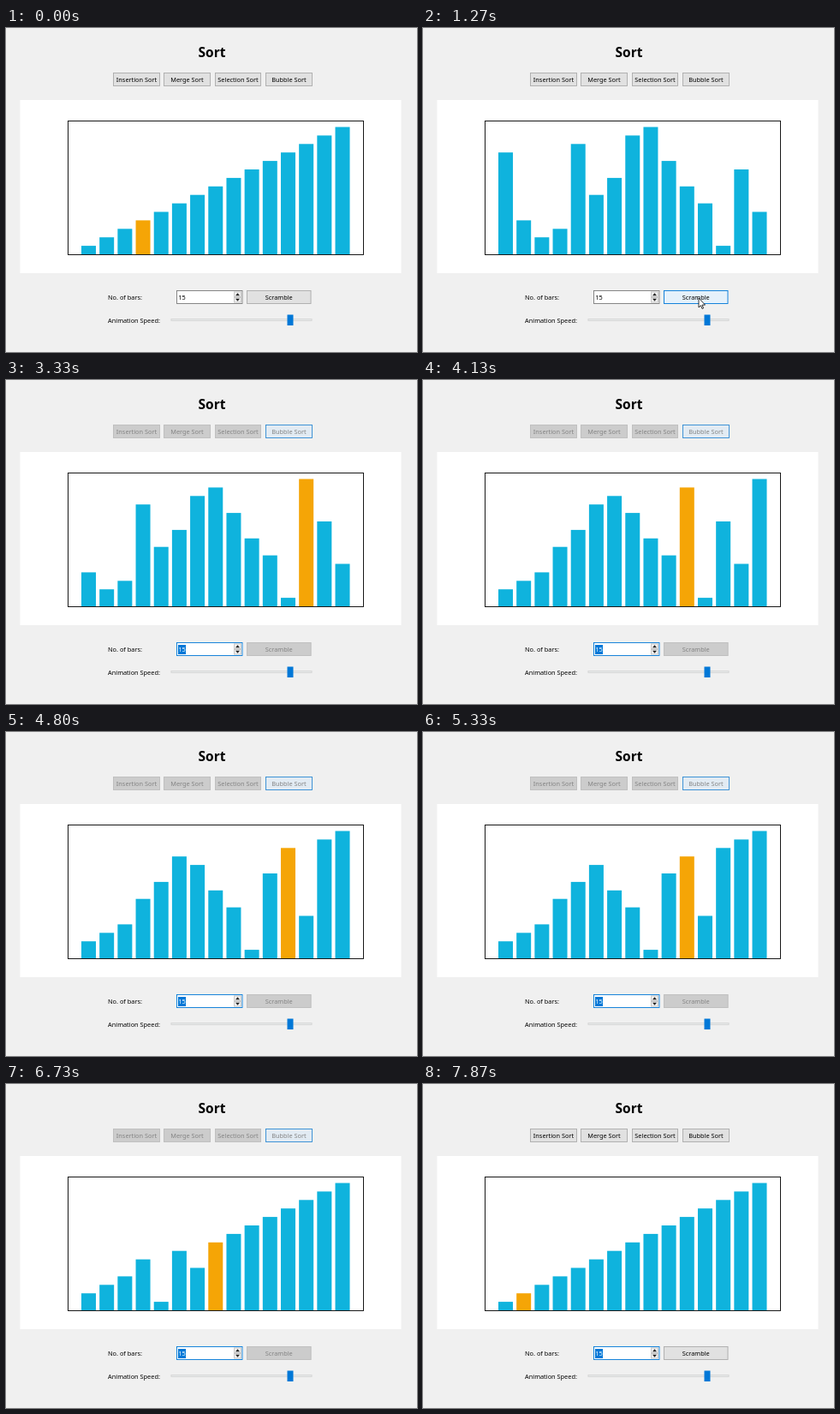
These frames come from a looping animation (480x378 px, 7.94 s). An HTML page with a canvas:

```html
<!DOCTYPE html>
<html lang="en">
<head>
<meta charset="utf-8">
<title>Sort</title>
<style>
  html, body { margin: 0; width: 100%; height: 100%; overflow: hidden; background: #f0f0f0; }
  canvas { display: block; }
</style>
</head>
<body>
<canvas width="480" height="378"></canvas>
<script>
const ctx = document.querySelector('canvas').getContext('2d');
const LOOP = 7940, SCRAMBLE = 1270, START = 2487, STEP = 87;
const BLUE = '#0078d7', FONT = '"Noto Sans", "Open Sans", sans-serif';
const ordered = Array.from({ length: 15 }, (_, i) => i + 1);
const scrambled = [12, 4, 2, 3, 13, 7, 9, 14, 15, 11, 8, 6, 1, 10, 5];

// Every swap of the bubble sort is one step; plain comparisons take no time.
const steps = [{ bars: scrambled, hot: -1 }];
const work = [...scrambled];
for (let end = 14; end > 0; end--) {
  for (let j = 0; j < end; j++) {
    if (work[j] < work[j + 1]) continue;
    [work[j], work[j + 1]] = [work[j + 1], work[j]];
    steps.push({ bars: [...work], hot: j + 1 });
  }
}
const FINISH = START + STEP * steps.length;

// Pointer stops: time, x, y
const pointer = [
  [660, 486, 333], [1130, 322, 315], [1440, 322, 315],
  [2130, 343, 59], [2500, 343, 59], [2680, 486, 84]
];

function chartAt(t) {
  if (t < SCRAMBLE) return { bars: ordered, hot: 3 };
  const k = Math.floor((t - START) / STEP);
  return steps[Math.min(Math.max(k, 0), steps.length - 1)];
}

function pointerAt(t) {
  const i = pointer.findIndex(p => p[0] > t);
  if (i < 1) return null;
  const [t0, x0, y0] = pointer[i - 1], [t1, x1, y1] = pointer[i];
  const u = (t - t0) / (t1 - t0), e = u * u * (3 - 2 * u);
  return [x0 + (x1 - x0) * e, y0 + (y1 - y0) * e];
}

function box(x, y, w, h, fill, line) {
  ctx.fillStyle = fill;
  ctx.fillRect(x, y, w, h);
  if (!line) return;
  ctx.strokeStyle = line;
  ctx.lineWidth = 0.9;
  ctx.strokeRect(x + 0.5, y + 0.5, w - 1, h - 1);
}

function text(str, x, y, color = '#000', align = 'left', font = '7.35px ') {
  ctx.font = font + FONT;
  ctx.textAlign = align;
  ctx.fillStyle = color;
  ctx.fillText(str, x, y);
}

function shape(points, fill, line) {
  ctx.beginPath();
  points.forEach(([x, y]) => ctx.lineTo(x, y));
  ctx.closePath();
  ctx.fillStyle = fill;
  ctx.fill();
  if (!line) return;
  ctx.strokeStyle = line;
  ctx.lineWidth = 0.8;
  ctx.stroke();
}

const looks = {
  normal: ['#e1e1e1', '#adadad', '#000'],
  hover: ['#e5f1fb', BLUE, '#000'],
  pressed: ['#cce4f7', '#005499', '#000'],
  disabled: ['#cccccc', '#bfbfbf', '#838383'],
  held: ['#e2ebf3', '#2f8bd3', '#838383']
};

function button(label, x, y, w, look) {
  const [fill, line, color] = looks[look];
  box(x, y, w, 16, fill, line);
  text(label, x + w / 2, y + 11, color, 'center');
}

function draw(t) {
  const busy = t >= START && t < FINISH, focus = t >= START;
  const mouse = pointerAt(t);
  const look = (x, y, w, click) => {
    if (busy) return 'disabled';
    const over = mouse && mouse[0] >= x && mouse[0] < x + w && mouse[1] >= y && mouse[1] < y + 16;
    if (!over) return 'normal';
    return t >= click - 80 && t < click ? 'pressed' : 'hover';
  };

  box(0, 0, 480, 378, '#f0f0f0');
  text('Sort', 240.5, 33.5, '#000', 'center', 'bold 15.5px ');
  button('Insertion Sort', 125, 52, 55, look(125, 52, 55));
  button('Merge Sort', 184, 52, 55, look(184, 52, 55));
  button('Selection Sort', 244, 52, 54, look(244, 52, 54));
  button('Bubble Sort', 303, 52, 55, busy ? 'held' : look(303, 52, 55, START));

  box(16.5, 84, 445, 202, '#fff');
  box(72, 108, 346, 157, '#fff', '#000');
  const { bars, hot } = chartAt(t);
  bars.forEach((v, i) => {
    const top = 264 - 9.9 * v;
    box(88 + 21.18 * i, top, 17, 264 - top, i === hot ? '#f5a506' : '#0fb3dd');
  });

  text('No. of bars:', 119, 317);
  box(199, 306, 77.5, 16, '#fff', focus ? BLUE : '#7a7a7a');
  if (focus) box(201, 309, 9, 11, BLUE);
  text('15', 201.3, 317, focus ? '#fff' : '#000');
  box(266, 307.5, 9, 6.5, '#f0f0f0', '#c4c4c4');
  box(266, 314, 9, 6.5, '#f0f0f0', '#c4c4c4');
  shape([[268, 312.3], [270.5, 309.3], [273, 312.3]], '#222');
  shape([[268, 315.8], [270.5, 318.8], [273, 315.8]], '#222');
  button('Scramble', 281, 306, 75.5, look(281, 306, 75.5, SCRAMBLE));

  text('Animation Speed:', 119, 344);
  box(192.5, 339, 165, 3, '#e7eaea', '#d6d6d6');
  box(328.5, 334.5, 7, 12.5, BLUE);

  if (mouse) {
    const arrow = [[0, 0], [0, 11], [2.5, 8.7], [4, 12.5], [5.6, 11.8], [4, 8.1], [7.5, 8.1]];
    shape(arrow.map(([x, y]) => [mouse[0] + x, mouse[1] + y]), '#fff', '#000');
  }
}

const begin = performance.now();
function frame() {
  draw((performance.now() - begin) % LOOP);
  requestAnimationFrame(frame);
}
frame();
</script>
</body>
</html>
```
